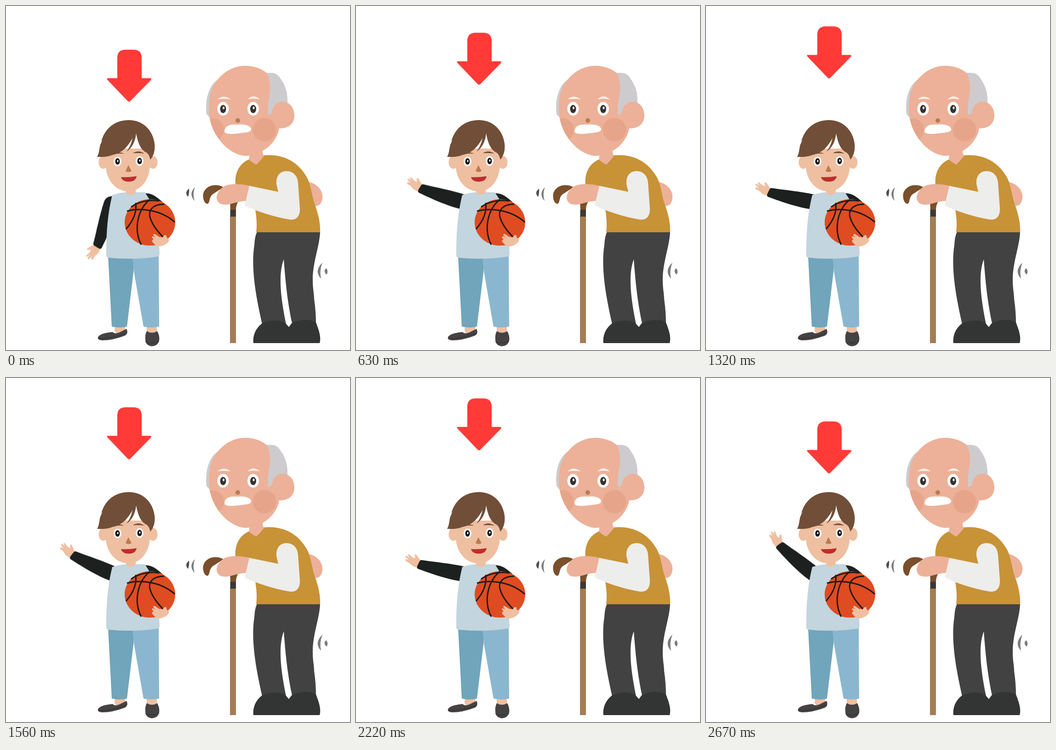
These frames come from a looping animation (748x748 px, 2.7 s). An HTML page:

```html
<!DOCTYPE html>
<html lang="en">
<head>
<meta charset="utf-8">
<title>Young and old</title>
<style>
  html, body { margin: 0; width: 100%; height: 100%; overflow: hidden; background: #fff; }
  svg { display: block; width: 100vw; height: 100vh; }
  .arrow { animation: bob 900ms cubic-bezier(.37, 0, .63, 1) infinite; }
  .arm {
    transform-origin: 233px 430px;
    animation: wave 2700ms cubic-bezier(.37, 0, .63, 1) infinite;
  }
  @keyframes bob {
    0%, 100% { transform: translateY(0); }
    52.8% { transform: translateY(-52.3px); }
  }
  /* one big raise, then two waves */
  @keyframes wave {
    0% { transform: rotate(-84.2deg); }
    33.333%, 66.667%, 100% { transform: rotate(28deg); }
    50%, 83.333% { transform: rotate(-.3deg); }
  }
  .skin { fill: #efbfa1; }
  .old { fill: #ecb198; }
  .sleeve { fill: #1c2120; }
  .hair { fill: #714e37; }
  .shoe { fill: #454244; }
  .white { fill: #fff; }
  .seam { fill: none; stroke: #1d1b1a; stroke-width: 3; }
</style>
</head>
<body>
<svg viewBox="0 0 748 748">
  <path class="arrow" fill="#ff3a37" d="M242 157V113Q242 95 260 95H277Q295 95 295 113V157H313Q318 157.500 315 161L271 206Q267.500 210 264 206L221 161Q217.500 157 222 157Z"/>

  <g id="boy">
    <path class="skin" d="M237 696L236 706Q240 715 248 711L259 704L260 696ZM306 696V708Q317 716 328 708V696Z"/>
    <path fill="#70a5bb" d="M222 544L279 546L277 580L263 697Q247 701 230 697Z"/>
    <path fill="#8ab7cf" d="M275 546L332 542L333 697Q316 701 299 697L278 577Z"/>
    <path class="shoe" d="M200 720Q205 711 232 709Q236 714 246 710L262 702Q267 712 258 717Q232 727 209 727Q198 726 200 720Z"/>
    <path class="shoe" d="M306 707Q317 714 329 707Q335 719 333 728Q330 739 317 740Q303 738 303 725Q302 715 306 707Z"/>
    <path d="M200 723Q225 725 263 711M303 730Q318 737 333 728" fill="none" stroke="#2c2a2b"/>

    <g class="arm">
      <path class="skin" d="M142 400L137 392Q134 389 132 385Q129 382 127 385L129 392L123 390L116 384Q112 382 113 386L117 391L111 387Q106 386 108 390L115 395L110 394Q106 394 108 398L116 402L122 408L134 413Z"/>
      <path class="sleeve" d="M144 396C170 400 205 403 236 410C254 414 254 445 234 442.500C205 440 165 426 135 415Q131 413 134 407L138 399Q140 395 144 396Z"/>
    </g>

    <path class="sleeve" d="M301 407C316 406 328 415 340 426L335 450H310Z"/>
    <path fill="#c3d5de" d="M231 411Q245 406 261 405H302L318 430L332 500L334 540Q334 544 329 545Q275 553 221 547Q218 546 218 541C218 505 219 460 231 411Z"/>

    <path class="skin" d="M261 395H282V405Q271 416 261 406Z"/>
    <ellipse class="skin" cx="211.500" cy="340" rx="10" ry="14"/>
    <ellipse class="skin" cx="319.500" cy="340" rx="10" ry="14"/>
    <path class="skin" d="M216 310H313V346C312 380 292 403 266 403C239 403 218 379 217 348Z"/>
    <path class="hair" d="M198 328C204 320 202 303 210 286C220 262 240 248 268 248C302 249 322 275 323.500 304Q324 322 314 334C312 329 312 324 306 319C293 313 287 299 283 277C281 297 273 309 262 317C269 307 273 298 275 287C265 307 250 321 231 324Q222 329 198 328Z"/>
    <path class="white" d="M202 306Q204 297 210 290Q207 299 202 306Z"/>
    <path class="hair" d="M235 322Q244 315 257 321Q246 320 235 322ZM276 320Q288 312 301 321Q289 319 276 320Z"/>
    <g id="eye">
      <ellipse class="white" cx="242.500" cy="338" rx="8.500" ry="10.500"/>
      <ellipse cx="242.500" cy="338" rx="5" ry="7" fill="#161412"/>
      <ellipse class="white" cx="243" cy="337" rx="1.500" ry="2.500"/>
    </g>
    <use href="#eye" x="48" y="-1"/>
    <path fill="#bd7a4e" d="M266 346L273 359Q267 363 260 359Z"/>
    <path fill="#bd2e2c" d="M250 372Q267 373 284 370Q282 382 267 382Q253 382 250 372Z"/>

    <ellipse cx="313" cy="470.500" rx="55" ry="50.500" fill="#df4c21"/>
    <g class="seam">
      <path d="M263 446C296 438 338 444 367 470"/>
      <path d="M313 421C290 437 275 481 294 519"/>
      <path d="M282 428C285 449 275 469 261 485"/>
      <path d="M344 431C317 431 308 446 314 462C320 479 331 491 341 502"/>
      <path d="M333 424C310 420 288 426 272 437"/>
    </g>
    <path class="skin" d="M318 513Q316 508 321 508L317 503Q317 500 321 501L325 503L320 498Q320 495 324 496L333 502L341 503Q345 496 349 499Q348 504 353 506Q357 510 350 516Q339 525 327 522Z"/>
  </g>

  <g id="elder">
    <path class="old" d="M656 382C677 386 690 402 688 418Q686 433 675 435Q666 432 660 420Z"/>
    <path fill="#424242" d="M546 491H683C682 522 666 560 667 598C667 615 670 625 670 637Q674 665 674 690H622C611 640 607 590 604 551C593 580 595 625 609 692H557C544 635 532 570 540 520Q541 500 546 491Z"/>
    <path fill="#323533" d="M538 733C536 714 545 699 557 690C572 682 600 682 608 690L615 698L621 690C637 681 660 680 674 688C680 704 686 720 682 733Z"/>
    <path fill="#c89237" d="M499 390C496 358 512 339 532 332L558 325C604 320 636 340 654 372C662 386 664 405 669 424C678 448 684 470 683 492H544C547 470 543 448 540 430L510 405Z"/>
    <path class="old" d="M525 312Q531 325 528 334Q536 341 544 345Q552 338 561 326Q556 320 559 305Z"/>

    <path fill="#cdcbcd" d="M464 158C441 169 432 205 436 235L443 243L450 190Z"/>
    <path fill="#cdcbcd" d="M560 146C580 144 590 145 597 158C610 176 613 193 612 215L570 245Z"/>
    <path id="face" class="old" d="M442 238C439 205 444 180 458 163C474 142 496 130 520 130C541 130 559 138 567 146C575 161 576 181 571 204Q568 224 570 237Q578 237 580 224C584 213 593 208 602 208C618 209 627 222 627 238C627 256 614 267 594 266C590 295 560 324 521 326C485 324 448 284 442 238Z"/>
    <clipPath id="clip"><use href="#face"/></clipPath>
    <g fill="#e6a58b" clip-path="url(#clip)">
      <circle cx="562" cy="269" r="25.500"/>
      <circle cx="449" cy="269" r="25"/>
    </g>
    <path fill="#f8eee8" d="M460 203Q473 191 489 203Q473 201 460 203ZM525 203Q538 190 552 203Q538 200 525 203Z"/>
    <g id="gaze">
      <ellipse class="white" cx="472" cy="223.500" rx="12.500" ry="15"/>
      <ellipse cx="472" cy="224" rx="6.500" ry="9" fill="#37302d"/>
      <ellipse class="white" cx="473" cy="221.500" rx="2" ry="3"/>
    </g>
    <use href="#gaze" x="65.500"/>
    <circle cx="504" cy="249" r="5" fill="#b97c50"/>
    <path class="white" d="M475 272C477 258 489 257 504 258C520 256 533 261 533 268C533 275 520 275 505 277C490 279 475 279 475 272Z"/>

    <path fill="#a57c52" d="M487 457H500V733H487Z"/>
    <path fill="#7a4f2b" d="M473 394C455 384 431 391 428.500 411C428 424 434 431 439 430C445 425 440 414 453 407ZM487 425H505Q500 433 500 444H488Z"/>
    <path fill="#3b3937" d="M487.500 443H500V458H487.500Z"/>
    <path class="old" d="M530 391C505 385 480 386 470 395C456 408 454 422 466 430C482 437 502 423 524 424Z"/>
    <path fill="#ededeb" d="M529 391L592 404L588 387C587 369 596 359 610 359C625 359 634 370 635 384L639 440C640 458 630 467 615 464C580 458 545 446 519 434Z"/>
  </g>

  <g fill="#7b7b7b">
    <path fill="#505050" d="M398 397Q387 406 396 415Q399 406 398 397Z"/>
    <path d="M411 394Q396 408 410 424Q405 408 411 394Z"/>
    <path d="M688 558Q669 576 685 593Q681 576 688 558Z"/>
    <path d="M696 570Q689 577 697 584Q702 577 696 570Z"/>
  </g>
</svg>
</body>
</html>
```
